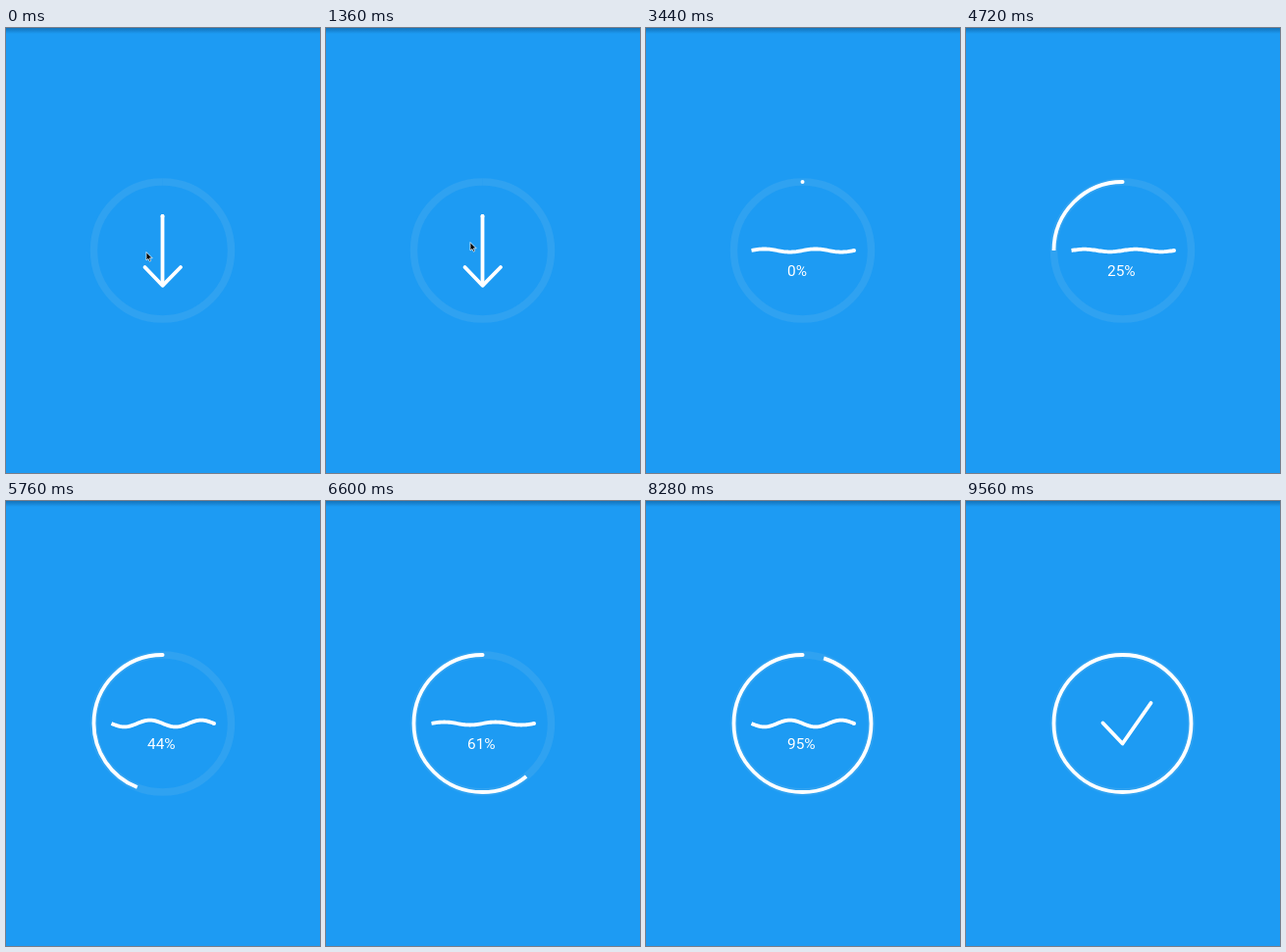
Recreate the animation shown at these times as an HTML page with a canvas. Size 320 by 454 pixels, loop 9.8 s.

```html
<!DOCTYPE html>
<html lang="en">
<head>
<meta charset="utf-8">
<title>Download button</title>
<style>
html, body { margin: 0; width: 100%; height: 100%; overflow: hidden; background: #1d9bf3; }
canvas { display: block; }
</style>
</head>
<body>
<canvas width="320" height="454"></canvas>
<script>
const LOOP = 9800, STEP = 40;
const CX = 159.5, CY = 227, R = 70;
const PRESS = 2040, FLATTENED = 2580, DONE = 8480;
const { PI, sin, cos, max, min, floor } = Math;
const ctx = document.querySelector('canvas').getContext('2d');

const mix = (a, b, k) => a + (b - a) * k;
const span = (t, from, length) => min(1, max(0, (t - from) / length));

// Left end, tip and right end of the bent line.
const ARROW = [[141.5, 244], [CX, 262.8], [178, 244]];
const FLAT = [[108, CY], [CX, CY], [212, CY]];
const CHECK = [[139.5, 226.5], [CX, 247.5], [188.5, 206]];

// Percent at a few times; the first pace also runs backwards.
const PACE = [[3480, 0], [4720, 25.3], [5760, 44.5], [DONE, 100]];

function progress(t) {
  let i = 1;
  while (i < PACE.length - 1 && t > PACE[i][0]) i++;
  const [[t0, p0], [t1, p1]] = [PACE[i - 1], PACE[i]];
  return floor(min(100, mix(p0, p1, (t - t0) / (t1 - t0))));
}

function line(points, cap = 'round') {
  ctx.beginPath();
  points.forEach(p => ctx.lineTo(...p));
  ctx.lineWidth = 3.8;
  ctx.lineCap = cap;
  ctx.lineJoin = 'round';
  ctx.stroke();
}

const morph = (from, to, k) =>
  line(from.map((p, i) => p.map((v, j) => mix(v, to[i][j], k))));

function dot(x, y) {
  ctx.beginPath();
  ctx.arc(x, y, 2, 0, 2 * PI);
  ctx.fill();
}

function ring(part, color, width) {
  ctx.beginPath();
  ctx.arc(CX, CY, R, -PI / 2, -PI / 2 - part * 2 * PI, true);
  ctx.strokeStyle = color;
  ctx.lineWidth = width;
  ctx.lineCap = 'butt';
  ctx.stroke();
}

function wave(step, grow) {
  const height = 3.5 * grow * cos(2 * PI * (step - 44) / 26.3 + 3.35);
  const points = [];
  for (let k = 0; k <= 1; k += 1 / 64)
    points.push([mix(107.5, 212, k), CY - height * sin(4 * PI * k)]);
  line(points, 'butt');
  dot(212, CY);
}

// Circles once, hops up, then leaves to the lower left.
function pointer(t) {
  const turn = 2 * PI * span(t, 0, 960);
  const hop = sin(PI * span(t, 1160, 240));
  const leave = span(t, 1600, 1240);
  ctx.save();
  ctx.translate(
    143 + 6 * (1 - cos(turn)) + 8 * hop - 153 * leave ** 6.5,
    229 + 8 * sin(turn) - 20 * hop + 55 * leave ** 3);
  const shape = new Path2D('M0 0V8L2 6.4L3.3 9.2L4.6 8.6L3.4 5.8H5.8Z');
  ctx.strokeStyle = 'rgba(255,255,255,.7)';
  ctx.lineWidth = 1;
  ctx.fillStyle = '#000';
  ctx.fill(shape);
  ctx.stroke(shape);
  ctx.restore();
}

function background() {
  ctx.fillStyle = '#1d9bf3';
  ctx.fillRect(0, 0, 320, 454);
  const shade = ctx.createLinearGradient(0, 0, 0, 6);
  shade.addColorStop(0, 'rgba(0,40,80,.34)');
  shade.addColorStop(1, 'rgba(0,40,80,0)');
  ctx.fillStyle = shade;
  ctx.fillRect(0, 0, 320, 6);
}

function draw(t) {
  const step = progress(t), percent = max(0, step);
  background();
  ring(1, '#2fa2f1', 7.5);
  if (percent) ring(percent / 100, '#fff', 3.8);

  ctx.fillStyle = ctx.strokeStyle = '#fff';
  const rise = span(t, 2500, 340);
  dot(CX, 192 - 35 * (rise + .6 * sin(PI * rise)));

  if (t < FLATTENED) {
    const half = 35 * (1 - span(t, PRESS, 375));
    if (half) line([[CX, CY - half], [CX, CY + half]]);
    morph(ARROW, FLAT, span(t, PRESS, FLATTENED - PRESS));
  } else if (t < DONE) {
    wave(step, span(t, FLATTENED, 200));
  } else {
    morph(FLAT, CHECK, 1 - (1 - span(t, DONE, 200)) ** 6);
  }

  if (t >= 2800 && t < DONE) {
    ctx.font = '15.4px Roboto, sans-serif';
    ctx.fillText(percent + '%', 144, 253);
  }
  pointer(t);
}

const start = performance.now();
function frame() {
  const t = (performance.now() - start) % LOOP;
  draw(floor(t / STEP) * STEP);
  requestAnimationFrame(frame);
}
frame();
</script>
</body>
</html>
```
